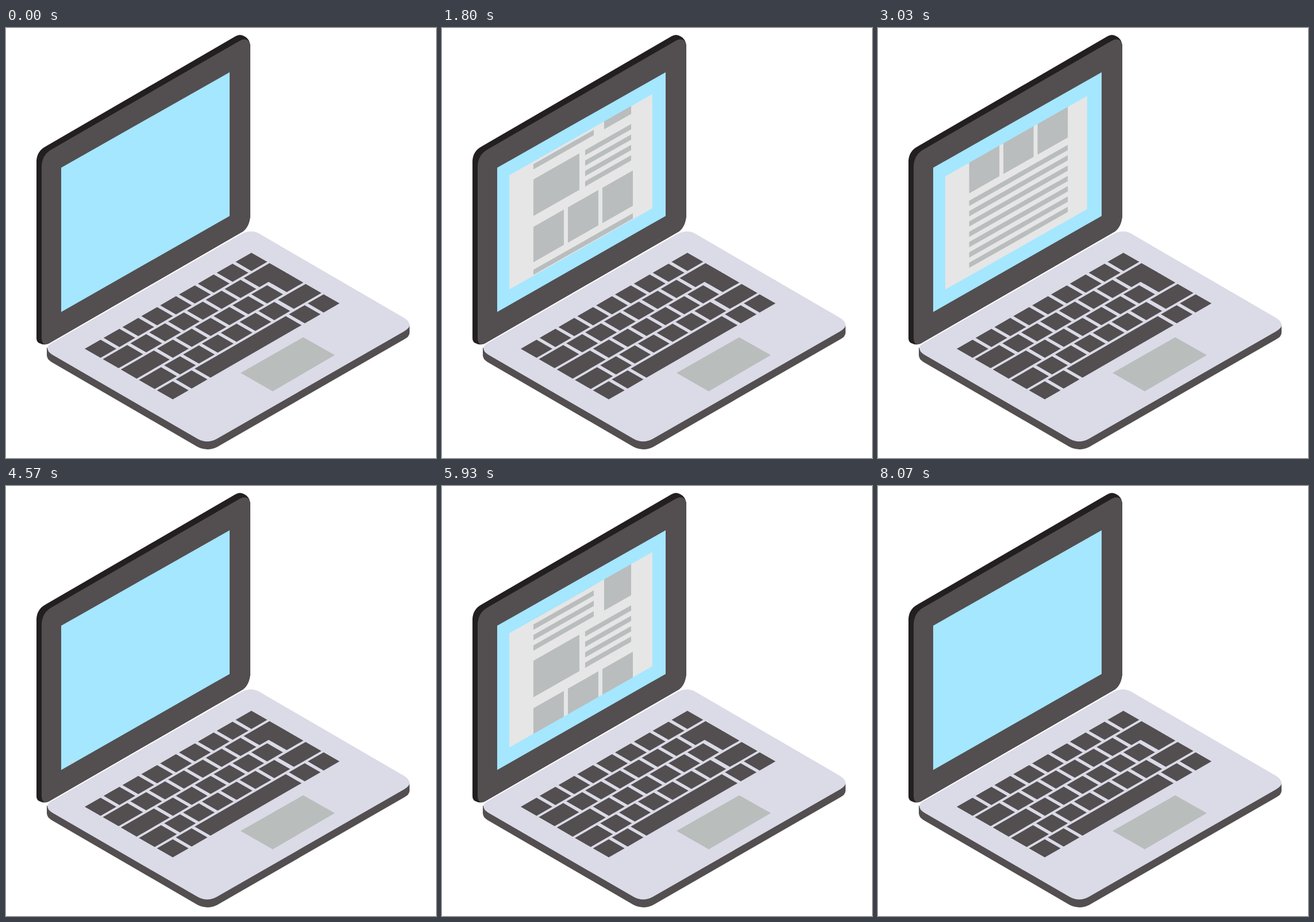
An HTML page for the animation above (9.01 s loop, 748 px wide and 748 px high).

```html
<!DOCTYPE html>
<html lang="en">
<head>
<meta charset="utf-8">
<title>Laptop</title>
<style>
  html, body { margin: 0; width: 100%; height: 100%; overflow: hidden; background: #fff; }
  svg { display: block; width: 100%; height: 100%; }
</style>
</head>
<body>
<svg viewBox="0 0 748 748">
  <defs>
    <clipPath id="pane"><rect x="117" y="232.2" width="249" height="199"/></clipPath>
  </defs>

  <!-- lid -->
  <path fill="#231f20" d="M53 540V231Q54 214 69 206L399 14.500Q407 9.500 415 14.500Q424 19 425 31V325Q424 345 412 354L74 549Q66 552 60 549Q53 547 53 540Z"/>
  <path fill="#534e50" d="M62 541V240Q63 221 78 212L407 22Q414 18 420 21Q425 24 425 32V325Q424 345 412 354L74 549Q63 553 62 541Z"/>
  <path fill="#a4e7ff" d="M96 243L389 77V327L96 494Z"/>

  <!-- base -->
  <path fill="#534e50" d="M71 556V569Q71 576 79 581L333 728.500Q350 737 367 729L692 542Q702 537 702 530V517L350 650Z"/>
  <path fill="#dbdae7" d="M85 545L411 357.500Q426 350 441 358L692 504Q702 510 702 517Q702 522 692 528L367 714.500Q350 724 333 714.500L80 568Q72 563 72 556Q73 551 85 545Z"/>
  <path fill="#b9bebd" d="M408 600L517 538L572 569L464 632Z"/>
  <g id="keys" fill="#534e50" transform="matrix(1 -.576 1 .575 137 558)"></g>

  <!-- page on the screen -->
  <g id="page">
    <g transform="matrix(1 -.567 0 1 0 90.15)">
      <g clip-path="url(#pane)">
        <rect x="117" y="232.2" width="249" height="199" fill="#e6e6e6"/>
        <g id="content" fill="#b9bdbe"></g>
      </g>
    </g>
  </g>
</svg>
<script>
const byId = id => document.getElementById(id);
const keys = byId('keys'), page = byId('page'), content = byId('content');

function rect(parent, x, y, width, height) {
  const el = document.createElementNS('http://www.w3.org/2000/svg', 'rect');
  for (const [name, value] of Object.entries({ x, y, width, height })) el.setAttribute(name, value);
  parent.append(el);
}

// Keyboard: each row lists its wide keys [from, to] and a run of square keys.
const KEY = 27.5, KEY_PITCH = 32.8, ROW_PITCH = 31.4;
const rows = [
  { start: 0, count: 9, wide: [] },
  { start: 48, count: 6, wide: [[0, 42.5], [245, 290]] },
  { start: 63, count: 6, wide: [[0, 57.5], [261, 290]] },
  { start: 44, count: 6, wide: [[0, 38.5], [242, 290]] },
  { start: 0, count: 2, wide: [[65.6, 224], [229.6, 257], [262.4, 290]] }
];
rows.forEach(({ start, count, wide }, r) => {
  const v = r * ROW_PITCH;
  for (let i = 0; i < count; i++) rect(keys, start + i * KEY_PITCH, v, KEY, KEY);
  for (const [from, to] of wide) rect(keys, from, v, to - from, KEY);
});
rect(keys, 261, ROW_PITCH + KEY - 1, 29, 6);  // joins the two halves of Enter

// Page layout
function lines(x, y, width, count) {
  for (let i = 0; i < count; i++) rect(content, x, y + i * 18.1, width, 9.2);
}
lines(159, 223, 105, 4);
rect(content, 282, 223, 47, 63.5);
rect(content, 159, 304, 80, 63.5);
lines(249, 304, 80, 4);
for (const x of [159, 219, 279]) rect(content, x, 386.5, 53, 61.5);
lines(159, 461, 173, 7);

// Motion, in steps of 1/30 s
const LOOP = 9010, CYCLE = 135, PHASE = 0.2, POWER = 3.4;
const SCROLL = [36.8, -44.2, -162];
const progress = (step, start, length) =>
  Math.min(1, Math.max(0, (step - start + PHASE) / length));
const sine = p => (1 - Math.cos(Math.PI * p)) / 2;

function draw(time) {
  const step = Math.floor((time % LOOP + 5) * 0.03) % CYCLE;
  const opened = 1 - (1 - progress(step, 2, 28)) ** POWER;
  const closed = progress(step, 86, 21 + PHASE) ** POWER;
  const scale = step < 2 || step >= 107 ? 0 : step < 86 ? opened : 1 - closed;
  const [top, middle, bottom] = SCROLL;
  const y = top + (middle - top) * sine(progress(step, 30, 28))
                + (bottom - middle) * sine(progress(step, 58, 28));
  page.setAttribute('visibility', scale > 0 ? 'visible' : 'hidden');
  page.setAttribute('transform', `translate(111 485) scale(${scale}) translate(-111 -485)`);
  content.setAttribute('transform', `translate(0 ${y})`);
}

const begin = performance.now();
function tick() {
  draw(performance.now() - begin);
  requestAnimationFrame(tick);
}
tick();
</script>
</body>
</html>
```
